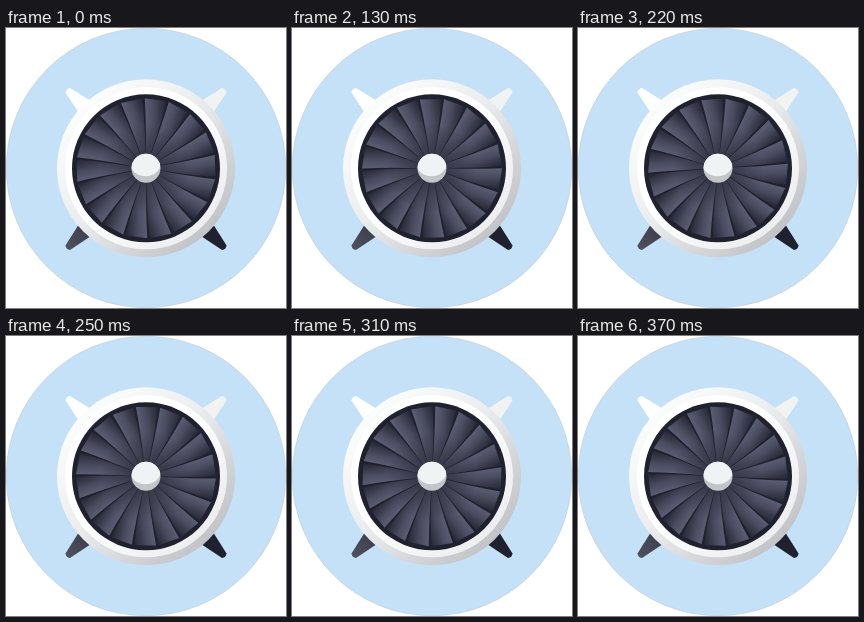
Write an HTML page that moves like this. It is 280 by 280 pixels and loops after 0.47 s.

```html
<!DOCTYPE html>
<html lang="en">
<head>
<meta charset="utf-8">
<title>Turbine</title>
<style>
html, body { margin: 0; width: 100%; height: 100%; overflow: hidden; background: #fff; }
svg { display: block; width: 100vw; height: 100vh; }
</style>
</head>
<body>
<svg viewBox="0 0 280 280">
  <defs>
    <linearGradient id="shell" x1=".15" y1=".15" x2=".85" y2=".85">
      <stop offset="0" stop-color="#fbfcfc"/>
      <stop offset=".45" stop-color="#ebecee"/>
      <stop offset="1" stop-color="#c2c4c8"/>
    </linearGradient>
    <linearGradient id="lip" x1=".15" y1=".15" x2=".85" y2=".85">
      <stop offset=".4" stop-color="#fff"/>
      <stop offset="1" stop-color="#eceeef"/>
    </linearGradient>
    <linearGradient id="metal" gradientUnits="userSpaceOnUse" x1="0" y1="0" x2="3.8" y2="21.7">
      <stop offset="0" stop-color="#5b5d73"/>
      <stop offset=".4" stop-color="#494b5f"/>
      <stop offset="1" stop-color="#242533"/>
    </linearGradient>
    <radialGradient id="depth">
      <stop offset=".2" stop-color="#222331" stop-opacity=".6"/>
      <stop offset=".65" stop-color="#222331" stop-opacity="0"/>
    </radialGradient>
    <linearGradient id="finL" x1="1" y1="0" x2="0" y2="1">
      <stop offset="0" stop-color="#3a3b4a"/>
      <stop offset="1" stop-color="#50525f"/>
    </linearGradient>
    <clipPath id="cap"><circle cx="140" cy="140.3" r="14.5"/></clipPath>
  </defs>
  <circle cx="140" cy="140" r="139.8" fill="#c5e1f7" stroke="#b3c3ce" stroke-width=".5"/>
  <path d="M59.5 64.5 Q60 60.5 64 60 L85 73 L73 85Z" fill="#fff"/>
  <path d="M220.5 64.5 Q220 60.5 216 60 L195 73 L207 85Z" fill="#f1f2f2"/>
  <path d="M59.5 217.5 Q60 221.5 64 222 L85 208 L73 196Z" fill="url(#finL)"/>
  <path d="M220.5 217.5 Q220 221.5 216 222 L195 208 L207 196Z" fill="#20212e"/>
  <circle cx="140" cy="140.3" r="89" fill="url(#shell)"/>
  <circle cx="140" cy="140.3" r="81" fill="url(#lip)"/>
  <circle cx="140" cy="140.3" r="74" fill="#20212e"/>
  <g id="fan"></g>
  <circle cx="140" cy="140.3" r="70" fill="url(#depth)"/>
  <circle cx="140" cy="140.3" r="14.5" fill="#c3c5c9"/>
  <ellipse cx="139.5" cy="134.5" rx="15.5" ry="13.8" fill="#eff3f4" clip-path="url(#cap)"/>
</svg>
<script>
const BLADES = 18, PITCH = 360 / BLADES, LOOP = 470, HOLD = 100, TICK = 30, LAST = 10;
const TURN = 3 * PITCH / (LAST + 1), PHASE = -1, RIM = 70;
const fan = document.getElementById("fan");

function polar(r, deg) {
  const a = deg * Math.PI / 180;
  return (r * Math.cos(a)).toFixed(2) + " " + (r * Math.sin(a)).toFixed(2);
}

const half = PITCH / 2;
const blade = `M${polar(12, -half)} Q${polar(43, -half + 1.5)} ${polar(RIM, -half)}` +
  `L${polar(RIM, half - 2)} Q${polar(43, half)} ${polar(12, half - 2)}Z`;

for (let i = 0; i < BLADES; i++) {
  const p = document.createElementNS("http://www.w3.org/2000/svg", "path");
  p.setAttribute("d", blade);
  p.setAttribute("fill", "url(#metal)");
  p.setAttribute("transform", `rotate(${i * PITCH})`);
  fan.appendChild(p);
}

function draw(now) {
  const t = now % LOOP;
  const step = t < HOLD ? 0 : Math.min(LAST, Math.floor((t - HOLD) / TICK) + 1);
  fan.setAttribute("transform", `translate(140 140.3) rotate(${PHASE + step * TURN})`);
}

let start = null;
function tick(now) {
  if (start === null) start = now;
  draw(now - start);
  requestAnimationFrame(tick);
}
draw(0);
requestAnimationFrame(tick);
</script>
</body>
</html>
```
